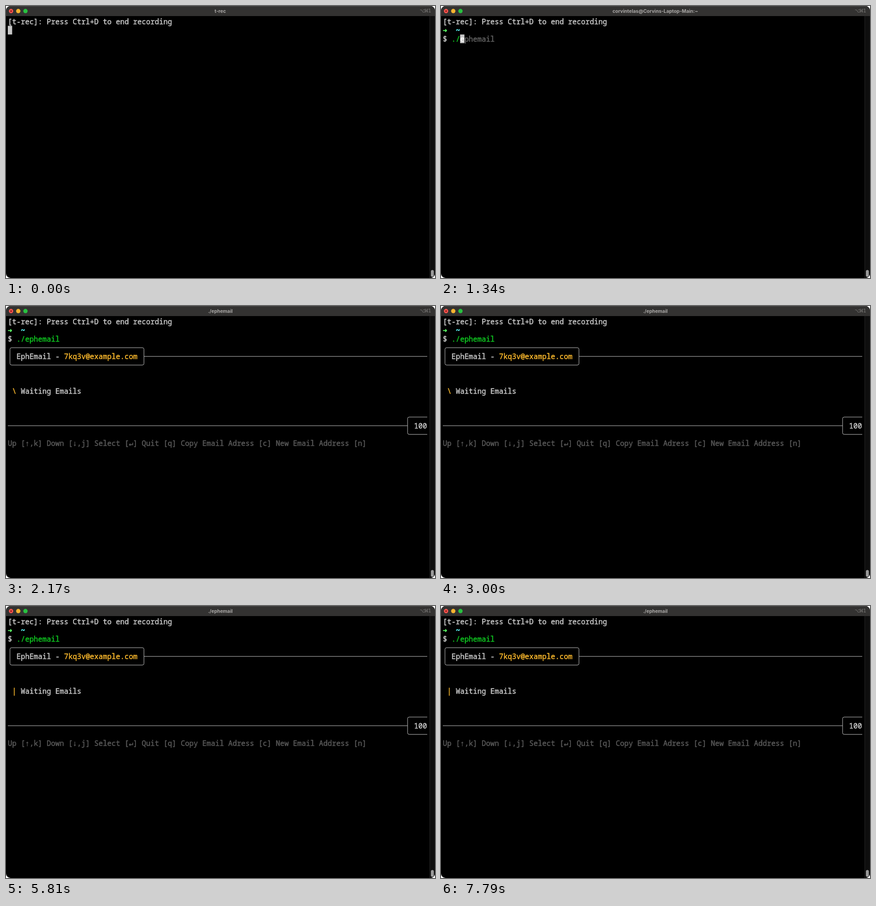
Animation of 941 by 595 pixels, one loop 8000 ms. Source, as an HTML page:

```html
<!DOCTYPE html>
<html lang="en">
<head>
<meta charset="utf-8">
<title>Terminal</title>
<style>
  html, body { margin: 0; width: 100%; height: 100%; overflow: hidden; background: #fff; }
  svg { display: block; width: 941px; height: 595px; }
  text { white-space: pre; }
  .cell {
    font: 500 15.8px "Noto Sans Mono", "DejaVu Sans Mono", monospace;
    color: #c7c7c7; fill: currentColor; stroke: currentColor; stroke-width: .5;
  }
  .title { font: 700 10.4px Inter, "Liberation Sans", sans-serif; fill: #aaa8a6; text-anchor: middle; }
  .keys { font: 10px "DejaVu Sans", sans-serif; fill: #7d7b79; text-anchor: middle; }
  .line { fill: none; stroke: #c7c7c7; stroke-width: 1; }
  .cursor { fill: #c7c7c7; }
  .cell.arrow { font: bold 15.8px "DejaVu Sans Mono", monospace; color: #5ffa68; }
  .cell.path { font-weight: 700; color: #60fdff; }
  .cell.cmd { color: #0fc520; }
  .cell.hint { color: #626262; }
  .cell.help { color: #585858; }
  .cell.gold { color: #f8b72c; }
  .cell.lit { color: #fff; }
</style>
</head>
<body>
<svg viewBox="0 0 941 595">
  <defs>
    <clipPath id="win"><rect width="941" height="595" rx="10"/></clipPath>
    <clipPath id="grid"><rect y="22" width="924" height="573"/></clipPath>
  </defs>
  <g clip-path="url(#win)">
    <rect width="941" height="595"/>
    <rect width="941" height="22" fill="#333231"/>
    <rect width="941" height="1" fill="#4b4a49"/>
    <circle cx="11.1" cy="11.1" r="4.75" fill="#f6544e"/>
    <circle cx="11.1" cy="11.1" r="1.6" fill="#6d0d0a"/>
    <circle cx="26.9" cy="11.1" r="4.75" fill="#f6b42f"/>
    <circle cx="42.7" cy="11.1" r="4.75" fill="#28c140"/>
    <g class="keys">
      <text x="913" y="13.5">⌥</text>
      <text x="922" y="13.5">⌘</text>
      <text x="929.5" y="13.5">1</text>
    </g>
    <rect x="929" y="22" width="12" height="573" fill="#0e0e0e"/>
    <rect x="929" y="22" width="1" height="573" fill="#262626"/>
    <rect x="932" y="577.5" width="6.5" height="15" rx="3.25" fill="#9b9b9b"/>
    <g id="titles"></g>
    <g id="screen" clip-path="url(#grid)"></g>
  </g>
</svg>
<script>
const LOOP = 8000, COL = 9.48, ROW = 18.96, LEFT = 4, TOP = 24.9;
const PROMPT = 250, TITLED = 520, DOT = 790, SLASH = 1070;
const ACCEPT = 1350, RUN = 1620, RENAMED = 1900, APP = 2170;
const ticks = [2430, 2710, 3000, 3280, 3560, 3840, 4130, 4410, 4690, 4970,
  5250, 5530, 5810, 6090, 6370, 6660, 6940, 7220, 7500, 7790];
const screen = document.getElementById('screen');
const titles = document.getElementById('titles');
const timed = [];

function add(parent, tag, attrs, from = 0, to = LOOP, text = '') {
  const el = document.createElementNS('http://www.w3.org/2000/svg', tag);
  for (const key in attrs) el.setAttribute(key, attrs[key]);
  el.textContent = text;
  parent.append(el);
  if (from > 0 || to < LOOP) timed.push({ el, from, to });
  return el;
}
const x = col => LEFT + col * COL;
const y = row => TOP + row * ROW;
const title = (text, from, to) =>
  add(titles, 'text', { class: 'title', x: 470, y: 14.5 }, from, to, text);
const put = (col, row, text, kind, from, to) =>
  add(screen, 'text', { class: 'cell ' + kind, x: x(col), y: y(row) + 15.2 }, from, to, text);
const cursor = (col, row, from, to) =>
  add(screen, 'rect', { class: 'cursor', x: x(col), y: y(row) - 0.5, width: COL, height: ROW }, from, to);
const line = d => add(screen, 'path', { class: 'line', d }, APP);
// box lines run through cell centres
const box = (left, top, cols) => add(screen, 'rect', {
  class: 'line', x: x(left + 0.5), y: y(top + 0.5), width: cols * COL, height: 2 * ROW, rx: 3.5
}, APP);

title('t-rec', 0, TITLED);
title('corvintelas@Corvins-Laptop-Main:~', TITLED, RENAMED);
title('./ephemail', RENAMED);

// shell
put(0, 0, '[t-rec]: Press Ctrl+D to end recording', '');
cursor(0, 1, 0, PROMPT);
put(0, 1, '➜', 'arrow', PROMPT);
put(3, 1, '~', 'path', PROMPT);
put(0, 2, '$', '', PROMPT);
cursor(2, 2, PROMPT, DOT);
cursor(3, 2, DOT, SLASH);
cursor(4, 2, SLASH, ACCEPT);
cursor(12, 2, ACCEPT, RUN);
cursor(0, 3, RUN, APP);
put(2, 2, '.', 'cmd', DOT, SLASH);
put(3, 2, '/', 'lit', DOT, SLASH);
put(4, 2, 'ephemail', 'hint', DOT, SLASH);
put(2, 2, './', 'cmd', SLASH, ACCEPT);
put(4, 2, 'e', 'lit', SLASH, ACCEPT);
put(5, 2, 'phemail', 'hint', SLASH, ACCEPT);
put(2, 2, './ephemail', 'cmd', ACCEPT);

// mail app
box(0, 3, 31);
line(`M${x(31.5)} ${y(4.5)}H924`);
put(2, 4, 'EphEmail -', '', APP);
put(13, 4, '7kq3v@example.com', 'gold', APP);
const spinner = put(1, 8, '|', 'gold', APP);
put(3, 8, 'Waiting Emails', '', APP);
line(`M4 ${y(12.5)}H${x(92.5)}`);
box(92, 11, 6);
put(94, 12, '100', '', APP);
[[0, 'Up ['], [4, '↑'], [5, ',k] Down ['], [15, '↓'], [16, ',j] Select ['], [28, '↵'],
  [29, '] Quit [q] Copy Email Adress [c] New Email Address [n]']]
  .forEach(([col, text]) => put(col, 14, text, 'help', APP));

const start = performance.now();
function draw() {
  const t = (performance.now() - start) % LOOP;
  for (const { el, from, to } of timed)
    el.style.visibility = t >= from && t < to ? 'visible' : 'hidden';
  // the spinner turns about 2.85 times per screen refresh
  const shown = ticks.filter(at => at <= t).length;
  spinner.textContent = '|/-\\'[(3 + Math.floor(shown * 2.852)) % 4];
  requestAnimationFrame(draw);
}
draw();
</script>
</body>
</html>
```
